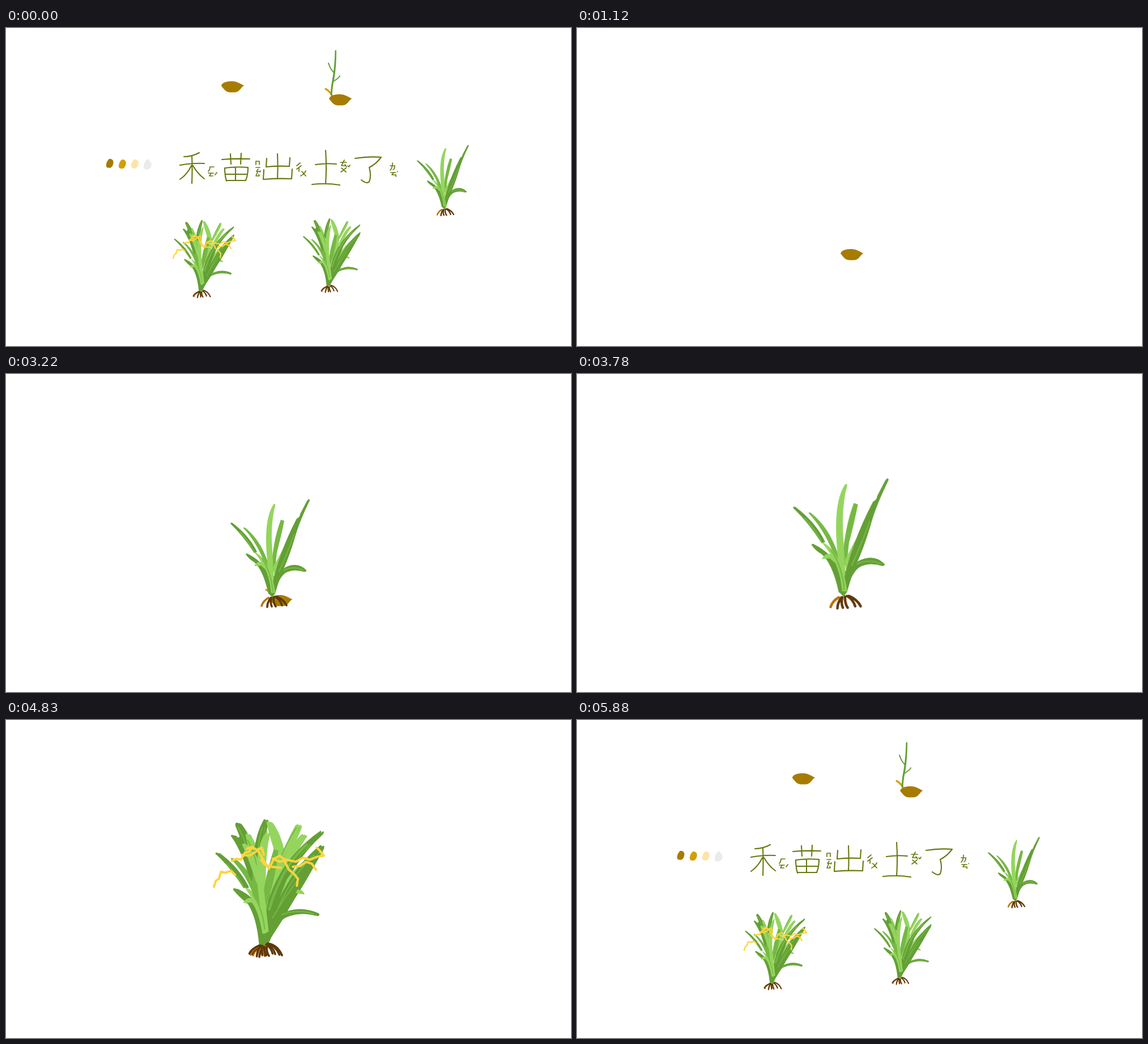
Write an HTML page that moves like this. It is 997 px wide and 561 px high and loops after 5.95 s.

```html
<!DOCTYPE html>
<html lang="zh-Hant">
<head>
<meta charset="utf-8">
<title>禾苗出土了</title>
<style>
  html, body { margin: 0; width: 100%; height: 100%; overflow: hidden; background: #fff; }
  svg { display: block; width: 997px; height: 561px; }

  .dark { fill: #649f36; }
  .mid { fill: #75b843; }
  .light { fill: #95d55e; }
  .husk { fill: #a67c00; }
  .line { fill: none; stroke-linecap: round; stroke-linejoin: round; }
  .vein { stroke: #75b843; stroke-width: 2; }
  .wide { stroke-width: 4.5; }
  .shade { stroke: #649f36; stroke-width: 2; }
  .root { stroke: #5f3809; stroke-width: 3.7; }
  .rust { stroke: #b8700f; }
  .ear { stroke: #ffd43f; stroke-width: 2.3; }
  .ink { stroke: #67780f; stroke-width: 2.1; }
  .small { stroke-width: 1.7; }

  .scene { visibility: hidden; animation: 5950ms step-end infinite; }
  .gallery { animation-name: gallery; }
  .title { animation-name: title; }
  .seed { animation-name: seed; }
  .stalk { animation-name: stalk; }
  .radicle { animation-name: radicle; }
  .young { animation-name: young, grow; }
  .roots { animation-name: roots; }
  .full { animation-name: full; }
  .ripe { animation-name: ripe; }
  .grains { animation-name: grains; }

  @keyframes gallery { 0%, 98.8235%, 100% { visibility: visible } 9.4118% { visibility: hidden } }
  @keyframes title { 0%, 98.8235%, 100% { visibility: visible } 18.8235% { visibility: hidden } }
  @keyframes seed { 0%, 63.5294%, 100% { visibility: hidden } 18.8235% { visibility: visible } }
  @keyframes stalk { 0%, 36.4706%, 100% { visibility: hidden } 27.0588% { visibility: visible } }
  @keyframes radicle { 0%, 63.5294%, 100% { visibility: hidden } 27.0588% { visibility: visible } }
  @keyframes young { 0%, 72.9412%, 100% { visibility: hidden } 36.4706% { visibility: visible } }
  @keyframes roots { 0%, 72.9412%, 100% { visibility: hidden } 54.1176% { visibility: visible } }
  @keyframes full { 0%, 90.5882%, 100% { visibility: hidden } 72.9412% { visibility: visible } }
  @keyframes ripe { 0%, 90.5882%, 100% { visibility: hidden } 81.1765% { visibility: visible } }
  @keyframes grains { 0%, 98.8235%, 100% { visibility: hidden } 90.5882% { visibility: visible } }
  @keyframes grow {
    0%, 36.4706% { transform: translate(166px, 137.4px) scale(.65) }
    45.8824% { transform: translate(89.7px, 70.5px) scale(.816) }
    54.1176% { transform: translate(0px, 0px) scale(1) }
    63.5294%, 100% { transform: translate(-96.4px, -82.3px) scale(1.206) }
  }
</style>
</head>
<body>
<svg viewBox="0 0 997 561">
  <defs>
    <path id="seed" class="husk" d="M465 398C467 391 476 390 485 390C493 390 497 394 505.5 397.5C500 400 498 409 489 409.5H480C472 409 469 402 465 398Z"/>
    <path id="radicle" class="line" stroke="#d39e14" stroke-width="3.2" d="M459 380.500Q466 384 470 392"/>
    <g id="stalk">
      <path class="dark" d="M475.500 313Q476.500 311 478 313Q478 340 474.500 362Q471 378 470.500 392L467.500 391Q468 376 471.500 360Q475 338 475.500 313Z"/>
      <path class="line shade" d="M464 335Q467 345 473 351M471.500 368L479 363Q483 360 484 357.500"/>
    </g>

    <g id="young">
      <path class="dark" d="M450 338L464 388L470 394L475 387L487 347L470 358Z"/>
      <path class="dark" d="M396 264Q396 261 400 263Q430 286 443 314L438 316Q419 286 396 264Z"/>
      <path class="line vein" d="M413 279Q427 294 437 312"/>
      <path class="mid" d="M419 272Q419 269 423 272Q448 292 461 329L464 350L455 330Q440 294 419 272Z"/>
      <path class="dark" d="M423 318Q424 315 428 318Q450 329 460 348L470 388H463Q454 346 438 332Q428 326 423 318Z"/>
      <path class="mid" d="M485 257L491 259Q486 284 478 315L474 350L468 345Q471 294 485 257Z"/>
      <path class="light" d="M472 230Q476 227 475 233Q468 258 469 295L474 386H468Q458 318 459 286Q460 248 472 230Z"/>
      <path class="light" d="M490 306L472 340L473 356L482 345Z"/>
      <path class="dark" d="M513 255Q519 252 519 247L531 224Q535 218 536 223Q517 262 510 288Q500 322 488 348L472 391L469 377Q480 318 513 255Z"/>
      <path class="line vein" d="M508 284Q496 318 482 348"/>
      <path class="dark" d="M474 385Q480 353 491 342Q514 330 530 346Q531 349 526 349Q507 343 493 351Q482 359 474 385Z"/>
      <path class="line vein" d="M490 346Q508 338 524 346"/>
      <path class="light" d="M438 339Q443 329 453 332L464 344L458 345L450 338Z"/>
      <path class="light" d="M437 313Q452 320 459 334Q471 353 475 386H469Q464 355 454 336Q445 323 437 313Z"/>
      <path class="line vein" d="M452 326Q468 350 471 384"/>
    </g>
    <g id="youngRoots" class="line root">
      <path class="rust" d="M463 395Q454 400 451 409"/>
      <path d="M467 395Q461 403 461 411M468 395Q466 404 469 410M472 394Q472 405 476 410M475 393Q484 398 487 408M478 393Q490 398 495 408"/>
    </g>

    <g id="full">
      <g class="line root">
        <path class="rust" d="M454 399Q438 405 436 415M453 402Q449 408 448 414M460 399L459 413"/>
        <path d="M453 398Q437 405 434 413M455 399Q448 406 447 418M457 400Q455 408 457 416M460 401Q460 410 464 416M463 397Q472 402 475 413M466 395Q480 399 487 415"/>
      </g>
      <path class="dark" d="M409 187Q409 179 416 184Q429 201 437 224L455 290L449 320L432 262Q424 222 409 187Z"/>
      <path class="line vein" d="M414 190Q432 222 445 280"/>
      <path class="dark" d="M401 205Q404 200 413 211L417 206Q434 244 445 292L450 325L440 304Q426 240 401 205Z"/>
      <path class="light" d="M427 203Q430 199 433 204Q449 232 451 272L448 300Q440 262 421 221Q423 216 431 222Z"/>
      <path class="line vein" d="M431 213Q443 235 448 262"/>
      <path class="dark" d="M459 177Q464 174 463 181Q456 212 451 248L442 234Q446 200 459 177Z"/>
      <path class="line vein" d="M457 190Q450 213 449 235"/>
      <path class="light" d="M464 182Q467 177 472 183Q486 203 492 235L490 275L471 325L470 300Q480 251 476 225Q470 207 464 182Z"/>
      <path class="light" d="M515 187Q521 182 522 189Q517 207 491 248L483 280Q489 233 515 187Z"/>
      <path class="line vein" d="M517 191Q500 216 490 242"/>
      <path class="light" d="M527 202L532 205Q519 223 505 249L487 269Q505 220 527 202Z"/>
      <path class="light" d="M559 229L560 233Q540 252 524 278L485 318L497 286Q522 250 559 229Z"/>
      <path class="light" d="M511 300Q524 297 527 308L510 305Z"/>
      <path class="mid" d="M477 229L485 231Q481 278 463 332L456 330Q460 282 477 229Z"/>
      <path class="dark" d="M374 237Q374 233 379 236Q411 260 429 295L424 298Q400 260 374 237Z"/>
      <path class="line vein" d="M394 255Q411 273 423 293"/>
      <path class="mid" d="M401 246Q402 243 405 245Q429 263 446 299L445 312L437 300Q425 270 401 246Z"/>
      <path class="dark" d="M405 300Q406 296 411 299Q438 312 450 335L461 350L486 342L465 391L462 397H451Q447 350 431 325Q415 313 405 300Z"/>
      <path class="mid" d="M440 270Q444 285 453 300L467 347L461 386L452 350L438 302Z"/>
      <path class="dark" d="M560 196Q562 199 559 202Q526 232 506 267L475 345L460 370Q461 310 499 255Q526 219 560 196Z"/>
      <path class="line vein wide" d="M535 221Q491 260 469 335"/>
      <path class="dark" d="M559 222Q563 221 561 227Q541 264 523 294Q505 322 487 354L462 393L459 376Q484 313 515 268Q538 238 559 222Z"/>
      <path class="line vein" d="M548 239Q507 279 485 332M522 280Q495 315 475 350"/>
      <path class="dark" d="M464 386Q474 354 490 343Q522 327 552 341Q555 345 550 346Q518 337 493 349Q478 357 464 386Z"/>
      <path class="line vein" d="M491 344Q520 334 547 343"/>
      <path class="light" d="M464 198Q467 194 466 201Q457 239 459 294L468 374L460 378Q445 286 447 253Q451 213 464 198Z"/>
      <path class="light" d="M423 324Q427 314 438 315L425 295Q440 305 447 318Q459 338 464 377L457 378Q450 337 438 323Z"/>
      <path class="line vein" d="M440 309Q457 332 461 370"/>
    </g>
    <g id="ripe">
      <use href="#full"/>
      <g class="line ear" transform="translate(-149 -421) scale(1.764)">
        <path d="M295 406L297 400L300 398L302 391L307 392L312 390L316 394M313 380L318 378L322 379L326 372L330 371L333 367L338 369L343 367L345 374M328 368L333 366L339 370L345 380L350 388L355 378L361 375L365 378"/>
        <path d="M323 374L330 375L337 371M342 379L346 384L353 386L362 387M354 378L361 381L368 379L377 381L384 377L391 379L398 376L405 375M405 375L401 370L398 367M366 381L370 389L375 393L379 398L378 405M374 386L382 385L387 381L393 383L397 389"/>
      </g>
    </g>

    <path id="grain" d="M428 263Q434 260 440 264Q446 269 444.500 277Q443 287 436 292Q428 295 421.500 291Q418 287 420 279Q421 271 425 268Z"/>
    <g id="grains">
      <use href="#grain" fill="#a67c00"/>
      <use href="#grain" fill="#d39f00" x="44" y="2.500"/>
      <use href="#grain" fill="#ffe3a6" x="87.500" y="2"/>
      <path fill="#ebebeb" d="M562 264Q566 260 570 268Q571 271 577 276Q579 283 575 291Q569 299 560 299Q549 298 550 289Q551 276 558 268Z"/>
    </g>
  </defs>

  <g class="scene gallery">
    <use href="#seed" x="-85.300" y="-296"/>
    <g transform="translate(105 -273)">
      <use href="#radicle"/>
      <use href="#stalk"/>
      <use href="#seed"/>
    </g>
    <g transform="translate(465.600 61.700) scale(.655)">
      <use href="#youngRoots"/>
      <use href="#young"/>
    </g>
    <use href="#full" transform="translate(321.700 240.300) scale(.541)"/>
    <use href="#ripe" transform="translate(84.400 238.700) scale(.567)"/>
    <use href="#grains" transform="translate(-35.500 98.400) scale(.506)"/>
  </g>

  <!-- Hand-lettered title with its phonetic marks -->
  <g class="scene title line ink" role="img" aria-label="禾苗出土了">
    <path d="M341 220Q328 227 314 227M307 242Q330 238 350 239M328 226Q329 250 328 274M327 243Q320 258 307 267M330 243Q338 257 350 266"/>
    <path d="M381 232Q405 230 430 231M396 222L397 240M415 221L414 240M386 247Q386 260 389 270M386 247Q406 244 427 246Q427 260 423 269M388 258H424M405 246V269M389 269H423"/>
    <path d="M479 222Q480 245 479 266M460 230L459 245Q480 243 500 244L501 229M455 250L454 267Q480 265 504 266L505 249"/>
    <path d="M546 241Q565 238 583 240M564 216Q566 245 564 275M540 276Q565 273 589 277"/>
    <path d="M616 230Q640 226 662 228Q653 240 641 246Q645 262 641 271Q637 276 627 268"/>
    <g class="small">
      <path d="M367 245H360Q360 250 357 253M357 256H366M362 256L359 261H365M369 259L372 255"/>
      <path d="M441 241V235H447V241M441 246H448M445 249L442 253H447M444 254L441 261H447L446 258M448 254L449 252"/>
      <path d="M519 238L513 243M521 243L513 249M517 247V253M522 253L529 261M529 252Q526 258 520 261"/>
      <path d="M590 237H601M597 233L592 243H600M598 241L601 245M592 247L600 254M600 247L591 254M603 243L605 245L607 242"/>
      <path d="M678 243H686Q686 249 683 250M682 238Q682 247 678 251M679 255H688M684 255L681 259H688V262M691 253V253.500"/>
    </g>
  </g>

  <use class="scene radicle" href="#radicle"/>
  <use class="scene stalk" href="#stalk"/>
  <use class="scene seed" href="#seed"/>
  <g class="scene young">
    <use class="scene roots" href="#youngRoots"/>
    <use href="#young"/>
  </g>
  <use class="scene full" href="#full"/>
  <use class="scene ripe" href="#ripe" x="-4.500" y="-1"/>
  <use class="scene grains" href="#grains"/>
</svg>
</body>
</html>
```
